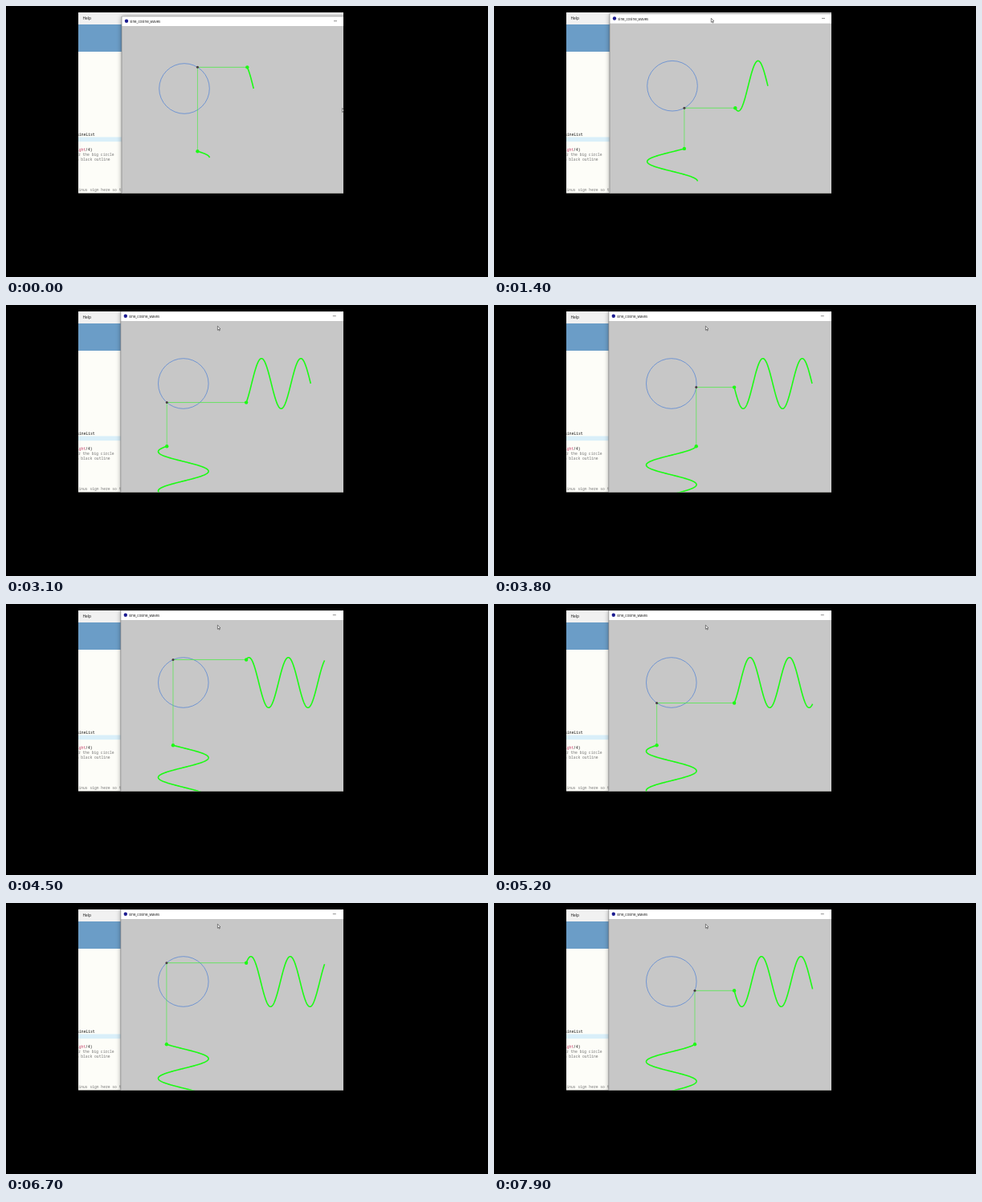
Recreate the animation shown at these times as an HTML page with a canvas. Size 600x338 px, loop 8000 ms.

```html
<!DOCTYPE html>
<html lang="en">
<head>
<meta charset="utf-8">
<title>Sine and cosine waves</title>
<style>
html, body { margin: 0; width: 100%; height: 100%; overflow: hidden; background: #000; }
canvas { display: block; }
</style>
</head>
<body>
<canvas id="stage" width="600" height="338"></canvas>
<script>
const ctx = document.getElementById('stage').getContext('2d');
const LOOP = 8000, STEP = 100;
const SCREEN = { x: 90, y: 8, w: 330, h: 225.6 };
const RADIUS = 31.3, PX_PER_RAD = 7.8, MAX_SWEEP = 12.5;
const GREEN = '#1cfb14';
const SANS = '"Open Sans", "Noto Sans", sans-serif';
const MONO = '"Noto Sans Mono", "DejaVu Sans Mono", monospace';

// Each key is [time, value, ...]
const ANGLE = [[0, 58.3], [1400, 298.4], [3100, 588.9], [4500, 834.2], [6000, 1092], [6700, 1211.9], [7900, 1418.8]];
const WINDOW = [[0, 144, 13], [1000, 144, 13], [1400, 144, 9.7], [1700, 142.8, 8]];
const POINTER = [[0, 418.6, 127.5], [900, 271, 19], [1400, 270.3, 15.3], [1800, 268, 14], [2700, 263.4, 26.3]];

function at(keys, t) {
  const last = keys[keys.length - 1];
  if (t >= last[0]) return last.slice(1);
  const i = keys.findIndex(k => k[0] > t);
  const a = keys[i - 1], b = keys[i];
  const p = (t - a[0]) / (b[0] - a[0]);
  return a.slice(1).map((v, n) => v + (b[n + 1] - v) * p);
}

function rect(x, y, w, h, color) {
  ctx.fillStyle = color;
  ctx.fillRect(x, y, w, h);
}

function dot(x, y, r, color) {
  ctx.fillStyle = color;
  ctx.beginPath();
  ctx.arc(x, y, r, 0, Math.PI * 2);
  ctx.fill();
}

function line(x1, y1, x2, y2, color, width) {
  ctx.strokeStyle = color;
  ctx.lineWidth = width;
  ctx.beginPath();
  ctx.moveTo(x1, y1);
  ctx.lineTo(x2, y2);
  ctx.stroke();
}

function text(str, x, y, font, color, align = 'left') {
  ctx.font = font;
  ctx.fillStyle = color;
  ctx.textAlign = align;
  ctx.fillText(str, x, y);
}

function trace(sweep, point) {
  ctx.strokeStyle = GREEN;
  ctx.lineWidth = 1.6;
  ctx.lineJoin = 'round';
  ctx.beginPath();
  for (let s = 0; s < sweep; s += 0.05) ctx.lineTo(...point(s));
  ctx.lineTo(...point(sweep));
  ctx.stroke();
}

function drawEditor() {
  rect(90, 8, 330, 226, '#fdfdf8');
  rect(90, 8, 330, 15, '#f1f1f1');
  rect(90, 23, 330, 34, '#6b9dc7');
  rect(90, 163.5, 330, 5.7, '#d9eff9');
  text('Help', 95.5, 17, '4.85px ' + SANS, '#111');
  const code = '4.66px ' + MONO;
  text('sineList', 110.6, 162, code, '#111', 'right');
  text('/4)', 107.5, 181, code, '#111', 'right');
  text('height', 99.1, 181, code, '#c8486e', 'right');
  text('for the big circle', 134.6, 187, code, '#777', 'right');
  text('a black outline', 129.6, 193.4, code, '#777', 'right');
  text('minus sign here so t', 143.5, 231.3, code, '#777', 'right');
}

function drawWindow(x, y) {
  const w = 430 - x;
  ctx.save();
  ctx.shadowColor = 'rgba(0,0,0,0.4)';
  ctx.shadowBlur = 6;
  rect(x, y, w, 240, '#c7c7c7');
  ctx.restore();
  rect(x, y, w, 12, '#fff');
  line(x, y, x, 240, '#777', 0.6);
  line(x, y, 420, y, '#888', 0.5);
  dot(x + 6, y + 5.8, 2.2, '#1c1c90');
  text('sine_cosine_waves', x + 10.2, y + 7.8, '4.4px ' + SANS, '#111');
  line(x + 264, y + 5.7, x + 268, y + 5.7, '#444', 0.6);
}

function drawWaves(wx, wy, angle) {
  const cx = wx + 78, cy = wy + 90;
  const right = wx + 156.3, bottom = wy + 168.2;
  const sweep = Math.min(angle, MAX_SWEEP);
  const px = cx + RADIUS * Math.cos(angle);
  const py = cy - RADIUS * Math.sin(angle);

  ctx.strokeStyle = '#5585d4';
  ctx.lineWidth = 0.75;
  ctx.beginPath();
  ctx.arc(cx, cy, RADIUS, 0, Math.PI * 2);
  ctx.stroke();

  line(px, py, right, py, '#40f038', 0.7);
  line(px, py, px, bottom, '#40f038', 0.6);
  trace(sweep, s => [right + s * PX_PER_RAD, cy - RADIUS * Math.sin(angle - s)]);
  trace(sweep, s => [cx + RADIUS * Math.cos(angle - s), bottom + s * PX_PER_RAD]);
  dot(px, py, 1.5, '#4a3c40');
  dot(right, py, 2.2, GREEN);
  dot(px, bottom, 2.2, GREEN);
}

function drawPointer(x, y) {
  const shape = [[0, 0], [0, 5], [1.2, 4], [2, 5.8], [2.8, 5.4], [2, 3.7], [3.6, 3.6]];
  ctx.beginPath();
  shape.forEach(([dx, dy]) => ctx.lineTo(x + dx, y + dy));
  ctx.closePath();
  ctx.fillStyle = '#fff';
  ctx.fill();
  ctx.strokeStyle = '#333';
  ctx.lineWidth = 0.6;
  ctx.stroke();
}

function draw(t) {
  rect(0, 0, 600, 338, '#000');
  ctx.save();
  ctx.beginPath();
  ctx.rect(SCREEN.x, SCREEN.y, SCREEN.w, SCREEN.h);
  ctx.clip();
  const [wx, wy] = at(WINDOW, t);
  drawEditor();
  drawWindow(wx, wy);
  drawWaves(wx, wy, at(ANGLE, t)[0] * Math.PI / 180);
  drawPointer(...at(POINTER, t));
  ctx.restore();
}

const start = performance.now();
function tick() {
  const t = (performance.now() - start) % LOOP;
  draw(Math.floor(t / STEP) * STEP);
  requestAnimationFrame(tick);
}
tick();
</script>
</body>
</html>
```
